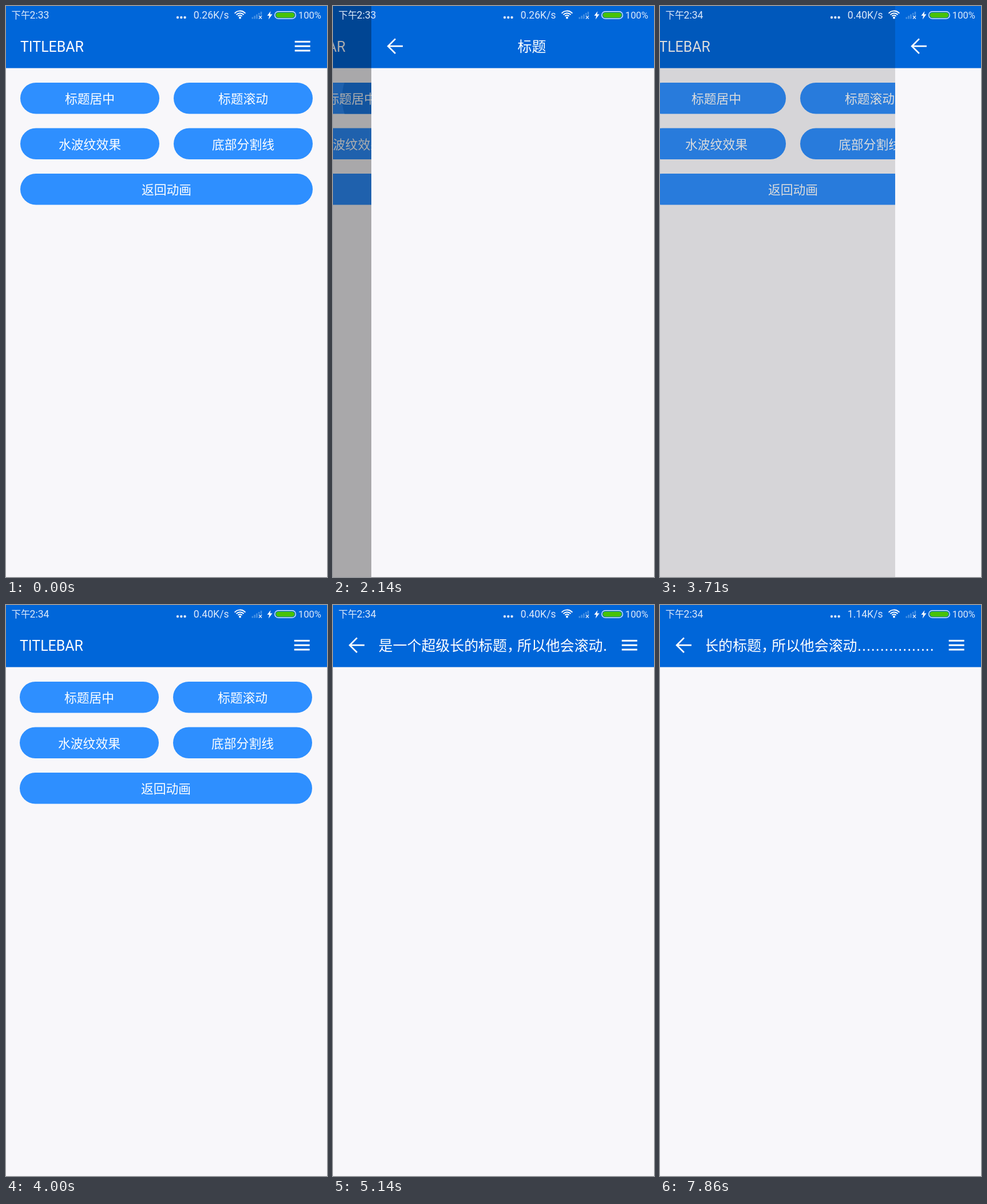
An HTML page with a canvas for the animation above (8000 ms loop, 561 by 998 pixels).

```html
<!DOCTYPE html>
<html lang="zh-CN">
<head>
<meta charset="utf-8">
<style>
  html, body { margin: 0; width: 100%; height: 100%; overflow: hidden; }
  canvas { display: block; }
</style>
</head>
<body>
<canvas id="stage" width="561" height="998"></canvas>
<script>
const W = 561, H = 998, BAR = 108.56, MIDDLE = 70.2, LOOP = 8000, FPS = 7;
const BLUE = '#0066d9', PAPER = '#f8f7fa', BUTTON = '#2e8fff', PRESSED = '#1b7cea', STATUS = '#dfeafa';
const CJK = '"Noto Sans CJK SC", "Noto Sans CJK", sans-serif';
const LATIN = 'Roboto, sans-serif';
const TITLE = 24.93, LABEL = 21.8;
const SLIDE = 520;
const OPEN_1 = 1928, CLOSE_1 = 3568, OPEN_2 = 4499;
const c = document.getElementById('stage').getContext('2d');

// x, y, width, label
const buttons = [
  [25, 134, 243, '标题居中'],
  [293, 134, 243, '标题滚动'],
  [25, 213.5, 243, '水波纹效果'],
  [293, 213.5, 243, '底部分割线'],
  [25, 293, 511, '返回动画']
];
const ripples = [
  { button: 0, x: 220, start: 1850, end: 3500, radius: 39, speed: 0.175 },
  { button: 1, x: 400, start: 4420, end: 8000, radius: 60, speed: 0.7 }
];

const clamp = v => Math.max(0, Math.min(1, v));
const easeOut = v => 1 - (1 - clamp(v)) ** 4;

function rect(x, y, w, h, color) {
  c.fillStyle = color;
  c.fillRect(x, y, w, h);
}

function text(str, x, y, size, family, align = 'left', color = '#fff') {
  c.font = `${size}px ${family}`;
  c.textAlign = align;
  c.fillStyle = color;
  c.fillText(str, x, y);
}

function line(points, width, color = '#fff') {
  c.beginPath();
  points.forEach(([x, y]) => c.lineTo(x, y));
  c.lineWidth = width;
  c.strokeStyle = color;
  c.stroke();
}

function disc(x, y, r, color) {
  c.beginPath();
  c.arc(x, y, r, 0, Math.PI * 2);
  c.fillStyle = color;
  c.fill();
}

function pill(x, y, w, h) {
  c.beginPath();
  c.roundRect(x, y, w, h, h / 2);
}

function pageBase(x = 0) {
  rect(x, 0, W, H, PAPER);
  rect(x, 0, W, BAR, BLUE);
}

function menuIcon() {
  for (const offset of [-7.8, 0, 7.8]) rect(504.7, MIDDLE - 1.5 + offset, 27, 3, '#fff');
}

function backIcon() {
  line([[55, MIDDLE], [30, MIDDLE]], 2.7);
  line([[42, MIDDLE - 12.8], [29.2, MIDDLE], [42, MIDDLE + 12.8]], 2.7);
}

function mainPage(t) {
  pageBase();
  text('TITLEBAR', 25, 80, TITLE, LATIN);
  menuIcon();
  buttons.forEach(([x, y, w, label], i) => {
    c.save();
    pill(x, y, w, 54.5);
    c.fillStyle = BUTTON;
    c.fill();
    c.clip();
    for (const r of ripples) {
      if (r.button === i && t >= r.start && t < r.end)
        disc(r.x, y + 27, r.radius + (t - r.start) * r.speed, PRESSED);
    }
    c.restore();
    text(label, x + w / 2, y + 36, LABEL, CJK, 'center');
  });
}

function centredPage() {
  pageBase();
  backIcon();
  text('标题', W / 2, 80.3, TITLE, CJK, 'center');
}

function marqueePage(t) {
  pageBase();
  backIcon();
  menuIcon();
  c.save();
  c.beginPath();
  c.rect(81, 40, 397, 60);
  c.clip();
  const x = 78.6 - Math.max(0, t - 4632) * 0.0468;
  const second = x + 10 * TITLE + 18;
  text('这是一个超级长的标题，', x, 80.3, TITLE, CJK);
  text('所以他会滚动', second, 80.3, TITLE, CJK);
  text('.'.repeat(22), second + 6 * TITLE, 80.3, TITLE, '"DejaVu Sans", sans-serif');
  c.restore();
}

function statusBar(t) {
  text('下午', 9.5, 22.3, 16.5, CJK, 'left', STATUS);
  text(t < 2710 ? '2:33' : '2:34', 41.5, 22.3, 17.6, LATIN, 'left', STATUS);
  for (const x of [300, 306.3, 312.6]) disc(x, 20, 2.2, STATUS);
  const speed = t < 2710 ? '0.26K/s' : t < 6710 ? '0.40K/s' : '1.14K/s';
  text(speed, 389.5, 22.3, 17.6, LATIN, 'right', STATUS);

  // wifi
  for (const r of [4.8, 8.6, 12.4]) {
    c.beginPath();
    c.arc(409, 21, r, -Math.PI * 0.77, -Math.PI * 0.23);
    c.lineWidth = 2;
    c.strokeStyle = '#fff';
    c.stroke();
  }
  disc(409, 20.6, 2, '#fff');

  // signal without service
  for (let i = 0; i < 5; i++) {
    const h = 3 + i * 2.4;
    rect(429.5 + i * 3.8, 22.5 - h, 2.6, i > 2 ? h - 7 : h, 'rgba(255,255,255,.28)');
  }
  line([[442, 17], [447, 22.5]], 1.4, STATUS);
  line([[447, 17], [442, 22.5]], 1.4, STATUS);

  // charging bolt and battery
  c.beginPath();
  [[462.5, 9], [456.5, 17], [460.2, 17], [458.8, 23.5], [465.5, 14.6], [461.5, 14.6]]
    .forEach(([x, y]) => c.lineTo(x, y));
  c.fillStyle = '#fff';
  c.fill();
  pill(469.7, 9.6, 36.6, 12.6);
  c.lineWidth = 1.2;
  c.strokeStyle = '#fff';
  c.stroke();
  pill(471.5, 11.4, 33, 9);
  c.fillStyle = '#48c206';
  c.fill();
  text('100%', 551, 22.3, 16.6, LATIN, 'right', STATUS);
}

// How far the upper page covers the main one, 0 to 1
function coverage(t) {
  if (t < 3500) return easeOut((t - OPEN_1) / SLIDE);
  if (t < 4300) return 1 - easeOut((t - CLOSE_1) / SLIDE);
  return easeOut((t - OPEN_2) / SLIDE);
}

function render(t) {
  const cover = coverage(t);
  // The lower page trails the upper one in both directions
  const closing = t >= 3500 && t < 4300;
  const depth = cover ** (closing ? 0.76 : 1.1);
  const shift = Math.round(131 * depth);

  c.save();
  c.translate(-shift, 0);
  mainPage(t);
  c.restore();
  if (cover > 0) {
    pageBase(W - shift);
    rect(0, 0, W, H, `rgba(0,0,0,${0.37 * depth})`);
    c.save();
    c.translate(Math.round(W * (1 - cover)), 0);
    if (t < 4300) centredPage(); else marqueePage(t);
    c.restore();
  }
  statusBar(t);
}

// The screen refreshes seven times a second
function tick() {
  const t = performance.now() % LOOP;
  render(Math.floor((t + 5) * FPS / 1000) * 1000 / FPS);
  requestAnimationFrame(tick);
}
tick();
</script>
</body>
</html>
```
